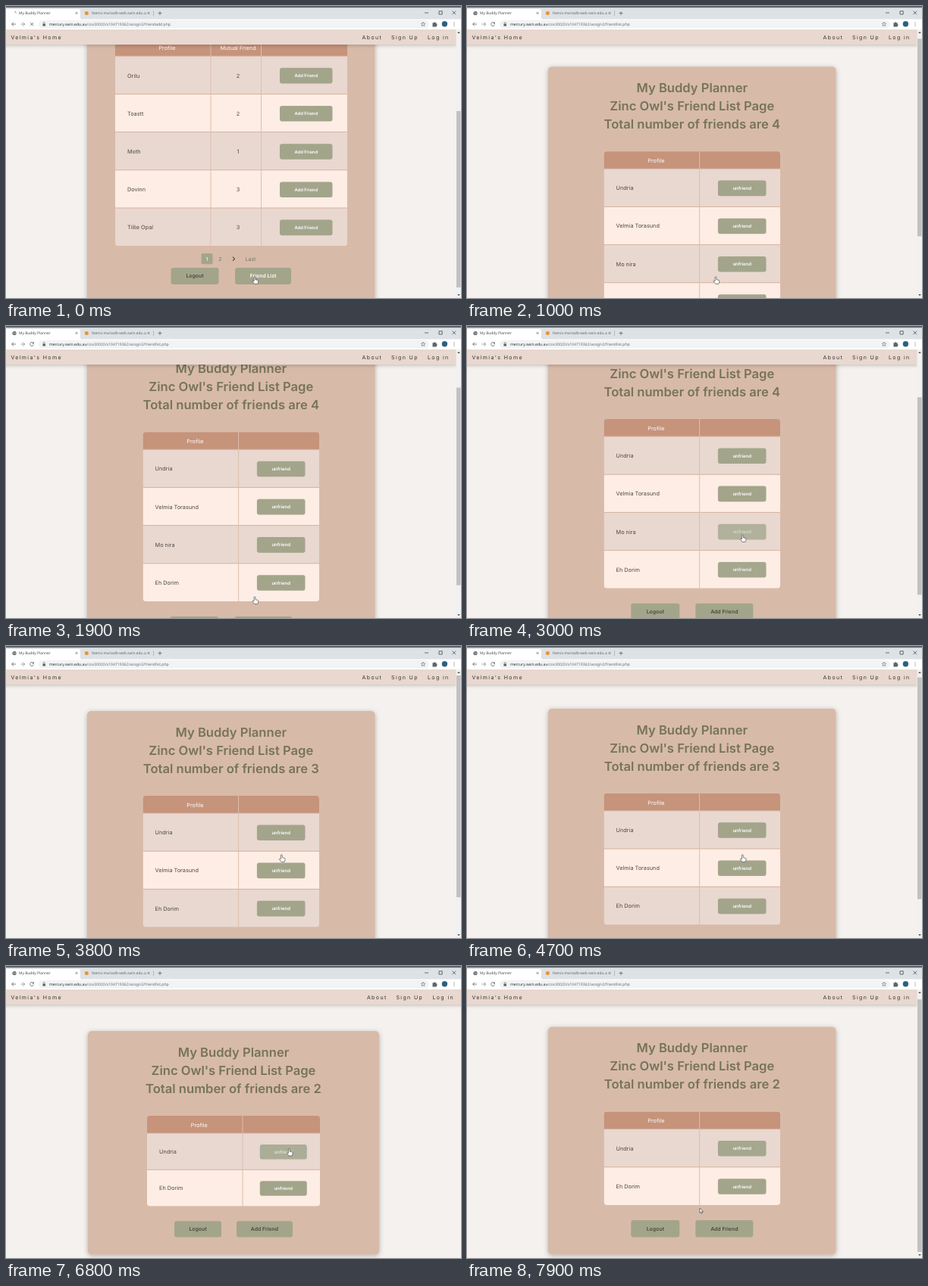
An HTML page for the animation above (8000 ms loop, 600 by 386 pixels).

```html
<!DOCTYPE html>
<html lang="en">
<head>
<meta charset="utf-8">
<title>Friend list</title>
<style>
html, body { margin: 0; width: 600px; height: 386px; overflow: hidden; background: #f4f1ee; }
svg { display: block; }
text { font-family: Inter, "Open Sans", sans-serif; text-rendering: geometricPrecision; white-space: pre; }
.ui text { font-family: "Open Sans", "Noto Sans", sans-serif; }
.nav text { letter-spacing: 1.4px; }
</style>
</head>
<body>
<svg width="600" height="386" viewBox="0 0 600 386">
  <defs>
    <filter id="soft" x="-10%" y="-10%" width="120%" height="125%">
      <feDropShadow dx="0" dy="1.5" stdDeviation="3" flood-color="#000" flood-opacity=".28"/>
    </filter>
    <filter id="bar" x="-5%" y="-20%" width="110%" height="200%">
      <feDropShadow dx="0" dy="1.5" stdDeviation="2" flood-color="#000" flood-opacity=".2"/>
    </filter>
  </defs>
  <g id="page"></g>
  <g id="nav" class="nav"></g>
  <g id="scroll"></g>
  <g id="chrome" class="ui"></g>
  <g id="live" class="ui"></g>
  <g id="cursor"></g>
</svg>
<script>
const LOOP = 8000;
const LOAD = [100, 3600, 6600];   // moments a new page appears
const WIDE_END = 6950;            // until then the last page has no scrollbar
const TITLE = 'My Buddy Planner';
const C = {
  card: '#d8baa9', head: '#c6937b', odd: '#e8d8d0', even: '#fdede4',
  green: [163, 165, 139], pale: [198, 195, 180], white: [255, 255, 255],
  title: '#75745a', ink: '#4d4845', dark: '#484a3e', bar: '#e8d8cf', gray: '#5f6368'
};
const $ = id => document.getElementById(id);
const clamp = u => Math.max(0, Math.min(1, u));
const smooth = u => u * u * (3 - 2 * u);
const mix = (a, b, u) => `rgb(${a.map((v, i) => Math.round(v + (b[i] - v) * u))})`;

function keyed(t, keys, ease = u => u) {
  let a = keys[0];
  for (const b of keys) {
    if (t < b[0]) {
      const u = ease(clamp((t - a[0]) / (b[0] - a[0] || 1)));
      return a.slice(1).map((v, i) => v + (b[i + 1] - v) * u);
    }
    a = b;
  }
  return a.slice(1);
}

const rect = (x, y, w, h, fill, r = 0, more = '') =>
  `<rect x="${x}" y="${y}" width="${w}" height="${h}" rx="${r}" fill="${fill}" ${more}/>`;
const text = (x, y, s, size, fill, more = '') =>
  `<text x="${x}" y="${y}" font-size="${size}" fill="${fill}" ${more}>${s}</text>`;
const line = (d, color, w = .8) =>
  `<path d="${d}" fill="none" stroke="${color}" stroke-width="${w}"/>`;
const circle = (x, y, r, fill) => `<circle cx="${x}" cy="${y}" r="${r}" fill="${fill}"/>`;
const MID = 'text-anchor="middle"';
const BOLD = MID + ' font-weight="600"';

// Small button in a table row; hot runs from 0 to 1 while hovered.
const rowButton = (x, y, w, h, label, size, hot = 0) =>
  rect(x, y, w, h, mix(C.green, C.pale, hot), 3) +
  text(x + w / 2, y + h / 2 + 2, label, size, mix(C.white, [156, 158, 134], hot), BOLD);

const bigButton = (x, y, w, h, label, fill = C.dark) =>
  rect(x, y, w, h, mix(C.green, C.green, 0), 3) +
  text(x + w / 2, y + h / 2 + 2.4, label, 6.9, fill, BOLD);

function table(x, y, w, dividers, rowH, count) {
  const h = 23 + rowH * count;
  let s = `<clipPath id="round">${rect(x, y, w, h, '#000', 4)}</clipPath><g clip-path="url(#round)">`;
  s += rect(x, y, w, 23, C.head);
  for (let i = 0; i < count; i++) {
    const top = y + 23 + i * rowH;
    s += rect(x, top, w, rowH, i % 2 ? C.even : C.odd) + line(`M${x} ${top}h${w}`, '#d6b39f', 1);
  }
  for (const d of dividers) s += line(`M${d} ${y}v${h}`, '#dcbfae', 1);
  return s + '</g>';
}

function addPage() {
  const people = [['Orilu', 2], ['Toastt', 2], ['Moth', 1], ['Dovinn', 3], ['Tillie Opal', 3]];
  let s = rect(107, 0, 379.5, 420, C.card, 5, 'filter="url(#soft)"');
  s += table(144, 43.2, 306, [270, 336.5], 50.2, people.length);
  s += text(212.5, 58, 'Profile', 7.3, '#fff', MID) + text(306, 58, 'Mutual Friend', 7.3, '#fff', MID);
  people.forEach(([name, n], i) => {
    const y = 66.2 + i * 50.2;
    s += text(160, y + 28.4, name, 7.3, C.ink) + text(306, y + 28.4, n, 7.3, C.ink, MID);
    s += rowButton(361, y + 15.6, 69.5, 20.6, 'Add Friend', 5.8);
  });
  s += rect(257.5, 327, 15, 14.3, mix(C.green, C.green, 0), 2) + text(265, 336.7, '1', 6.8, '#fff', MID);
  s += text(282.3, 336.7, '2', 6.8, C.title, MID) + text(322.5, 336.7, 'Last', 6.8, C.title, MID);
  s += line('M299 331.6l2.5 2.6l-2.5 2.6', C.dark, 1.1);
  return s + bigButton(217.5, 346, 63, 22, 'Logout') + bigButton(302, 346, 74, 22, 'Friend List', '#fff');
}

function listPage(names, scroll, wide, hot) {
  const n = names.length, mid = wide ? 300 : 296.8, half = wide ? 192 : 189.8;
  const rowH = wide ? 48.3 : 50.2, w = wide ? 228 : 232.4, x = mid - w / 2, split = x + 126;
  const bw = wide ? 62 : 63.6, bh = wide ? 19.6 : 20.6, bx = x + w - bw - (wide ? 17.2 : 18.5);
  const top = 86 - scroll, ty = top + 112, end = ty + 23 + rowH * n;
  const gy = end + (wide ? 19.6 : 20), gh = wide ? 21.4 : 22.4;
  let s = rect(mid - half, top, half * 2, gy + gh + 23 - top, C.card, 5, 'filter="url(#soft)"');
  [TITLE, "Zinc Owl's Friend List Page", `Total number of friends are ${n}`].forEach((v, i) => {
    s += text(mid, top + 33.8 + i * 24, v, 16.6, C.title, BOLD);
  });
  s += table(x, ty, w, [split], rowH, n) + text(x + 68.8, ty + 14.8, 'Profile', 7.3, '#fff', MID);
  names.forEach((name, i) => {
    const y = ty + 23 + i * rowH;
    s += text(x + 16, y + rowH / 2 + 3, name, 7.3, C.ink);
    s += rowButton(bx, y + (rowH - bh) / 2 + .6, bw, bh, 'unfriend', wide ? 5.9 : 6, hot[i]);
  });
  const lw = wide ? 62 : 64, aw = wide ? 74 : 76, span = lw + aw + (wide ? 20 : 21);
  s += bigButton(mid - span / 2, gy, lw, gh, 'Logout');
  return s + bigButton(mid + span / 2 - aw, gy, aw, gh, 'Add Friend');
}

function navBar(wide) {
  const dx = wide ? 6.4 : 0;
  let s = rect(-10, 31, 604 + dx * 3, 20, C.bar, 0, 'filter="url(#bar)"');
  s += text(6.4, 43.6, "Velmia's Home", 7, '#3a3533');
  for (const [x, v] of [[469.5, 'About'], [508, 'Sign Up'], [556, 'Log in']])
    s += text(x + dx, 43.6, v, 7, '#3a3533');
  return s;
}

function scrollBar(height, scroll) {
  const k = 339 / height;
  return rect(593.6, 31, 6.4, 355, '#f1f1f1') +
    rect(594, 39 + scroll * k, 5.6, 355 * k, '#c1c1c1') +
    '<path d="M595.2 36l1.8-2.2l1.8 2.2zM595.2 381l1.8 2.2l1.8-2.2z" fill="#555"/>';
}

function chrome() {
  const g = C.gray;
  let s = rect(0, 0, 600, 18, '#dee1e6') + rect(0, 0, 600, 2.2, '#62646b');
  s += '<path d="M0 18V4h95q3 0 3 3v8q0 3 3 3z" fill="#fff"/>' + rect(0, 17.5, 600, 13.5, '#fff');
  s += text(17, 11.3, TITLE, 4.9, '#3c4043');
  s += circle(106.3, 9.4, 2.5, '#e8962e') + text(113, 11.3, 'feenix-mariadb-web.swin.edu.a', 4.9, g);
  for (const x of [93, 188]) s += line(`M${x - 1.5} 7.9l3 3m0-3l-3 3`, g, .7);
  s += line('M194.5 6v7', '#9aa0a6', .6) + line('M200.5 9.5h5m-2.5-2.5v5', g);
  s += line('M552 9h5M571 6.8h4.2v4.2h-4.2zM588.5 6.6l4.6 4.6m0-4.6l-4.6 4.6', '#33363a', .7);
  s += rect(43, 18.8, 515, 10.6, '#f1f3f4', 5.3);
  s += line('M13 24h-5.4m2.6-2.6l-2.6 2.6l2.6 2.6', g) + line('M19.4 24h5.4m-2.6-2.6l2.6 2.6l-2.6 2.6', '#84888d');
  s += rect(48.4, 23.4, 3.6, 3, g, .4) + line('M49.2 23.5v-1a1 1 0 0 1 2 0v1', g, .6);
  s += line('M550 21.2l.8 1.8l2 .2l-1.5 1.3l.5 2l-1.8-1.1l-1.8 1.1l.5-2l-1.5-1.3l2-.2z', g, .6);
  s += '<path d="M562.5 22.3h1.6a1 1 0 0 1 2 0h1.6v1.7a1 1 0 0 1 0 2v1.4h-5.2z" fill="#5f6368"/>';
  s += circle(578.4, 23.8, 3.7, '#2c617f');
  for (const dy of [-2, 0, 2]) s += circle(591, 24 + dy, .6, g);
  return s;
}

function liveChrome(t, loading, file) {
  const g = C.gray;
  let s = `<text x="57" y="25.9" font-size="5.1" fill="#202124">mercury.swin.edu.au` +
    `<tspan fill="${g}">/cos30020/s104719362/assign2/${file}.php</tspan></text>`;
  if (loading) {
    s += `<g transform="rotate(${t * .5} 11 9.6)">${line('M11 7.3a2.3 2.3 0 0 1 2.3 2.3', '#7d8186', .8)}</g>`;
    return s + line('M32 21.9l4.2 4.2m0-4.2l-4.2 4.2', g);
  }
  s += circle(11, 9.6, 2.6, g) + line('M9 9.2q1.2-.9 2 0t2 .3M10.2 11.2l1.2-.4', '#fff', .6);
  return s + line('M36 22.4a2.5 2.5 0 1 0 .5 2.2', g) + '<path d="M36.9 20.9v2.6h-2.6z" fill="#5f6368"/>';
}

const HAND = 'M-.9 .7a.9.9 0 0 1 1.8 0v3l3.1.7q.9.3.8 1.3l-.5 2.6l-.6 1.2h-3.8l-2.5-3q-.8-1 .1-1.4q.7-.2 1.6.8z';
const ARROW = 'M0 0v6.4l1.5-1.4l1 2.2l1-.5l-1-2.1h2z';

const PATH = [
  [0, 328, 358], [2450, 328, 358], [2900, 363.3, 276], [5400, 363.3, 276],
  [5750, 373.3, 241.5], [7500, 373.3, 241.5], [7900, 307, 320]
];
const SCROLL = [
  [[900, 0], [2200, 75]],
  [[4600, 0], [4700, 3], [5100, 55.6]],
  [[6950, 0], [7150, 5.4]]
];
const NAMES = [
  ['Undria', 'Velmia Torasund', 'Mo nira', 'Eh Dorim'],
  ['Undria', 'Velmia Torasund', 'Eh Dorim'],
  ['Undria', 'Eh Dorim']
];
// page, row, pointer enters, pointer leaves
const HOVERS = [[0, 3, 2640, 2720], [0, 2, 2880, 9000], [1, 1, 5500, 9000], [2, 0, 6720, 7620]];

function render(t) {
  const page = LOAD.filter(v => t >= v).length - 1;
  const wide = page === 2 && t < WIDE_END;
  const loading = t < 100 || (t >= 3400 && t < 3600) || (t >= 6400 && t < 6600);
  if (page < 0) {
    $('page').innerHTML = addPage();
    $('scroll').innerHTML = scrollBar(516, 152);
  } else {
    const names = NAMES[page], [scroll] = keyed(t, SCROLL[page]);
    const hot = names.map(() => 0);
    for (const [p, row, from, to] of HOVERS)
      if (p === page) hot[row] += clamp((t - from) / 300) - clamp((t - to) / 300);
    $('page').innerHTML = listPage(names, scroll, wide, hot);
    $('scroll').innerHTML = wide ? '' : scrollBar(260 + 50.2 * names.length, scroll);
  }
  $('nav').innerHTML = navBar(wide);
  $('live').innerHTML = liveChrome(t, loading, page < 0 ? 'friendadd' : 'friendlist');
  const [x, y] = keyed(t, PATH, smooth);
  $('cursor').innerHTML = `<path transform="translate(${x} ${y})" d="${t < 7620 ? HAND : ARROW}" ` +
    'fill="#fff" stroke="#333" stroke-width=".6" stroke-linejoin="round"/>';
}

$('chrome').innerHTML = chrome();
const start = performance.now();
function tick() {
  render((performance.now() - start) % LOOP);
  requestAnimationFrame(tick);
}
tick();
</script>
</body>
</html>
```
